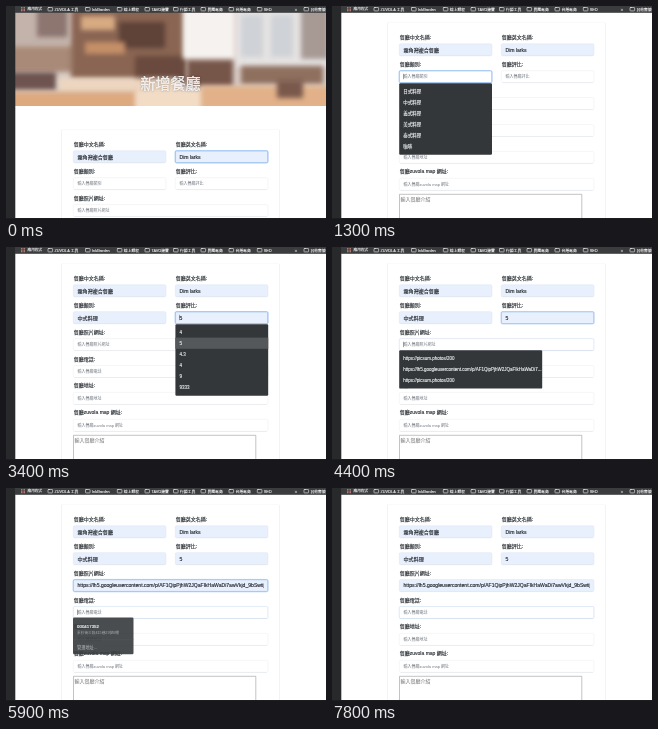
An HTML page with a canvas that plays this animation: 320 by 213 pixels, repeating every 8 s.

```html
<!DOCTYPE html>
<html lang="zh-Hant">
<head>
<meta charset="utf-8">
<title>新增餐廳</title>
<style>
html, body { margin: 0; width: 100%; height: 100%; overflow: hidden; background: #fff; }
canvas { display: block; width: 320px; height: 213px; }
</style>
</head>
<body>
<canvas id="stage"></canvas>
<script>
const W = 320, H = 213, LOOP = 8000, SCROLL = 107;
const FONT = '"Liberation Sans", "Noto Sans CJK TC", "Noto Sans CJK", sans-serif';
const canvas = document.getElementById('stage');
const ctx = canvas.getContext('2d');
const dpr = window.devicePixelRatio || 1;
canvas.width = Math.round(W * dpr);
canvas.height = Math.round(H * dpr);

const LEFT = 67.3, RIGHT = 169.3, HALF = 92.6, FULL = 194.6;
const rowY = i => 31 + 26.9 * i;
const PHOTO = 'https://lh5.googleusercontent.com/p/AF1QipPjhW2JQaFIkHaWaDi7awVkjd_9bSwtij';
const PHOTO_SHORT = 'https://lh5.googleusercontent.com/p/AF1QipPjhW2JQaFIkHaWaDi7...';
const PICSUM = 'https://picsum.photos/200';
const KINDS = ['日式料理', '中式料理', '義式料理', '美式料理', '泰式料理', '咖啡'];
const SCORES = ['4', '5', '4.3', '4', '9', '9333'];

const clamp = v => Math.max(0, Math.min(1, v));
const fade = (t, at) => clamp((t - at + 20) / 120);
const focus = (t, on, off) => fade(t, on) - fade(t, off);
const within = (t, a, b) => t >= a && t < b;

// Glyphs are set large and scaled down so small sizes keep exact widths;
// heft thickens the strokes by a share of the size.
function text(str, x, y, size, color, heft = 0) {
  ctx.save();
  ctx.translate(x, y + size * 0.37);
  ctx.scale(0.25, 0.25);
  ctx.font = `${size * 4}px ${FONT}`;
  ctx.fillStyle = ctx.strokeStyle = color;
  ctx.fillText(str, 0, 0);
  if (heft) {
    ctx.lineWidth = size * 4 * heft;
    ctx.lineJoin = 'round';
    ctx.strokeText(str, 0, 0);
  }
  ctx.restore();
}

function rect(x, y, w, h, color) {
  ctx.fillStyle = color;
  ctx.fillRect(x, y, w, h);
}

function box(x, y, w, h, r, fill, stroke, line = 0.6) {
  ctx.beginPath();
  ctx.roundRect(x, y, w, h, r);
  if (fill) { ctx.fillStyle = fill; ctx.fill(); }
  if (stroke) { ctx.strokeStyle = stroke; ctx.lineWidth = line; ctx.stroke(); }
}

// Soft blurred café behind the title
const hero = document.createElement('canvas');
hero.width = 311;
hero.height = 94;
(() => {
  const g = hero.getContext('2d');
  const part = (color, x, y, w, h) => {
    g.fillStyle = color;
    g.fillRect(x, y, w, h);
  };
  part('#d9cdc6', 0, 0, 311, 94);
  g.filter = 'blur(2.5px)';
  part('#c3b3ab', -5, -5, 60, 40);
  part('#8d7570', 22, -5, 30, 30);
  part('#a98a78', -5, 34, 64, 26);
  part('#8a6553', 56, -5, 114, 72);
  part('#d8ab82', 66, 4, 34, 14);
  part('#5f4238', 104, 10, 46, 26);
  part('#c48f68', 70, 30, 40, 12);
  part('#6a4a3e', 120, 44, 50, 28);
  part('#f6f2ef', 168, -5, 52, 52);
  part('#e6e3e3', 220, -5, 95, 60);
  part('#cfd2d6', 226, 3, 22, 42);
  part('#cfd2d6', 256, 3, 22, 42);
  part('#a79a95', 286, -5, 28, 52);
  part('#77564a', 172, 48, 46, 26);
  part('#8f705f', 226, 54, 82, 18);
  part('#6d5450', -5, 60, 46, 18);
  part('#edd6c0', 44, 66, 120, 14);
  part('#dda97f', -5, 80, 130, 20);
  part('#f3dcc6', 120, 78, 70, 20);
  part('#e2b189', 186, 74, 130, 24);
  part('#7a594c', 262, 68, 26, 18);
})();

function field({ x, row, w, label, hint, value, ring = 0, caret }) {
  const y = rowY(row), top = y + 6.8, mid = y + 12.8;
  text(label, x + 0.5, y, 5, '#33383d', 0.035);
  box(x, top, w, 12, 1.3, value ? '#e9f0fd' : '#fff', value ? '#dbe3f0' : '#ebedef', 0.5);
  rect(x + 1, top + 11.7, w - 2, 0.5, '#dfe3e8');
  if (ring > 0) {
    ctx.globalAlpha = ring;
    box(x, top, w, 12, 1.3, null, 'rgba(0,123,255,.12)', 1.6);
    box(x, top, w, 12, 1.3, null, '#8db8f0', 0.7);
    ctx.globalAlpha = 1;
  }
  ctx.save();
  ctx.beginPath();
  ctx.rect(x + 2, top, w - 6, 12);
  ctx.clip();
  if (value) text(value, x + 4.2, mid, 5.07, '#22272d', 0.03);
  else text(hint, x + 4.2, mid + 0.1, 4, '#737a82');
  ctx.restore();
  if (caret) rect(caret, mid - 2.9, 0.5, 5.4, '#444');
}

function menu(x, y, w, items, active, alpha = 1) {
  ctx.globalAlpha = alpha;
  box(x, y, w, items.length * 11.1 + 5, 1.2, '#34373a');
  items.forEach((item, i) => {
    const mid = y + 7.9 + i * 11.1;
    if (i === active) rect(x, mid - 5.6, w, 11.2, '#55585b');
    text(item, x + 4, mid, 4.5, '#f1f3f4', 0.03);
  });
  ctx.globalAlpha = 1;
}

function addressMenu(alpha) {
  ctx.globalAlpha = alpha;
  box(67, 129.6, 60.5, 36.6, 1.2, '#3b3e41');
  text('000417352', 71, 138, 4.4, '#f1f3f4', 0.05);
  text('雲杉街三段415巷29號6樓', 71, 144.6, 3.7, '#b4b7ba');
  rect(67, 151.6, 60.5, 0.5, '#55585b');
  text('管理地址...', 71, 159.2, 4.2, '#c4c7ca');
  ctx.globalAlpha = 1;
}

function folder(x) {
  box(x, 1.5, 4.6, 3.4, 0.5, null, '#d6d7d9', 0.7);
  rect(x, 1, 2, 0.8, '#d6d7d9');
}

function chrome() {
  rect(0, 0, 9.3, H, '#28292b');
  rect(9, 0, W - 9, 6.8, '#3b3c3e');
  for (let i = 0; i < 9; i++) rect(15 + (i % 3) * 1.5, 1.2 + Math.floor(i / 3) * 1.5, 1, 1, '#d08a80');
  text('應用程式', 21.5, 3.1, 3.7, '#f0f1f2', 0.03);
  const marks = [[42, 'ZUVOLA 工具'], [79.5, 'InkGarden'], [111.3, '線上課程'], [139, 'TAVO建置'],
    [167.5, '行銷工具'], [195, '異國電商'], [223, '台灣電商'], [251.3, 'SEO'], [298, '其他書籤']];
  for (const [x, name] of marks) {
    folder(x);
    text(name, x + 6.5, 3.1, 3.8, '#f0f1f2', 0.03);
  }
  text('»', 288.5, 2.8, 5, '#f0f1f2');
  rect(0, 212, W, 1, '#1c1d1f');
}

function form(t) {
  rect(55, 17, 0.6, 300, '#ececec');
  rect(273, 17, 0.6, 300, '#ececec');
  rect(55, 16.3, 218, 0.5, '#f5f5f5');

  const kind = t >= 2000 ? KINDS[1] : t >= 1600 ? KINDS[0] : '';
  const score = t >= 3400 ? '5' : t >= 3300 ? '4' : '';
  const photo = t >= 4900 ? PHOTO : t >= 4800 ? PICSUM : '';
  const blink = within(t, 5900, 6400) || within(t, 6900, 7400);

  field({ x: LEFT, row: 0, w: HALF, label: '餐廳中文名稱:', value: '霧角灣複合餐廳' });
  field({ x: RIGHT, row: 0, w: HALF, label: '餐廳英文名稱:', value: 'Dim larks',
    ring: 1 - fade(t, 1100), caret: within(t, 600, 1100) && 193.8 });
  field({ x: LEFT, row: 1, w: HALF, label: '餐廳類別:', hint: '輸入餐廳類別', value: kind,
    ring: focus(t, 1100, 2900), caret: within(t, 1100, 2300) && 71.3 });
  field({ x: RIGHT, row: 1, w: HALF, label: '餐廳評比:', hint: '輸入餐廳評比', value: score,
    ring: focus(t, 2900, 4400), caret: within(t, 2900, 3800) && 173.3 });
  field({ x: LEFT, row: 2, w: FULL, label: '餐廳照片網址:', hint: '輸入餐廳照片網址', value: photo,
    ring: focus(t, 4400, 5900), caret: within(t, 4400, 5300) && 71.3 });
  field({ x: LEFT, row: 3, w: FULL, label: '餐廳電話:', hint: '輸入餐廳電話',
    ring: t < 7800 ? fade(t, 5900) : 0.2, caret: blink && 71.5 });
  field({ x: LEFT, row: 4, w: FULL, label: '餐廳地址:', hint: '輸入餐廳地址' });
  field({ x: LEFT, row: 5, w: FULL, label: '餐廳zuvola map 網址:', hint: '輸入餐廳zuvola map 網址' });

  box(67.5, 188.3, 182.3, 60, 0, '#fff', '#9a9a9a', 0.6);
  text('輸入餐廳介紹', 68.6, 193.2, 5, '#757575');

  if (within(t, 1200, 2300)) menu(67.2, 77.2, 92.8, KINDS, t >= 2000 ? 1 : t >= 1600 ? 0 : -1);
  if (within(t, 3000, 3800)) menu(169.4, 77.2, 92.8, SCORES, t >= 3400 ? 1 : t >= 3300 ? 0 : -1);
  if (within(t, 4400, 5400)) {
    menu(67.2, 103.3, 143, [PICSUM, PHOTO_SHORT, PICSUM],
      t >= 4900 ? 1 : t >= 4800 ? 0 : -1, t >= 5300 ? 0.4 : 1);
  }
  if (within(t, 5900, 7800)) addressMenu(t < 6000 ? 0.92 : 1);
}

function draw(ms) {
  const t = Math.floor(ms / 100) * 100;
  const scroll = [0, 18, 62, 98, SCROLL][Math.min(4, t / 100)];
  ctx.setTransform(dpr, 0, 0, dpr, 0, 0);
  rect(0, 0, W, H, '#fff');
  ctx.save();
  ctx.translate(0, -scroll);
  ctx.drawImage(hero, 9, 6);
  ctx.shadowColor = 'rgba(60,40,30,.35)';
  ctx.shadowBlur = 2 * dpr;
  text('新增餐廳', 134.6, 77.6, 15, '#fff', 0.025);
  ctx.shadowColor = 'transparent';
  ctx.translate(0, SCROLL);
  form(t);
  ctx.restore();
  chrome();
}

function tick() {
  draw(performance.now() % LOOP);
  requestAnimationFrame(tick);
}
tick();
</script>
</body>
</html>
```
